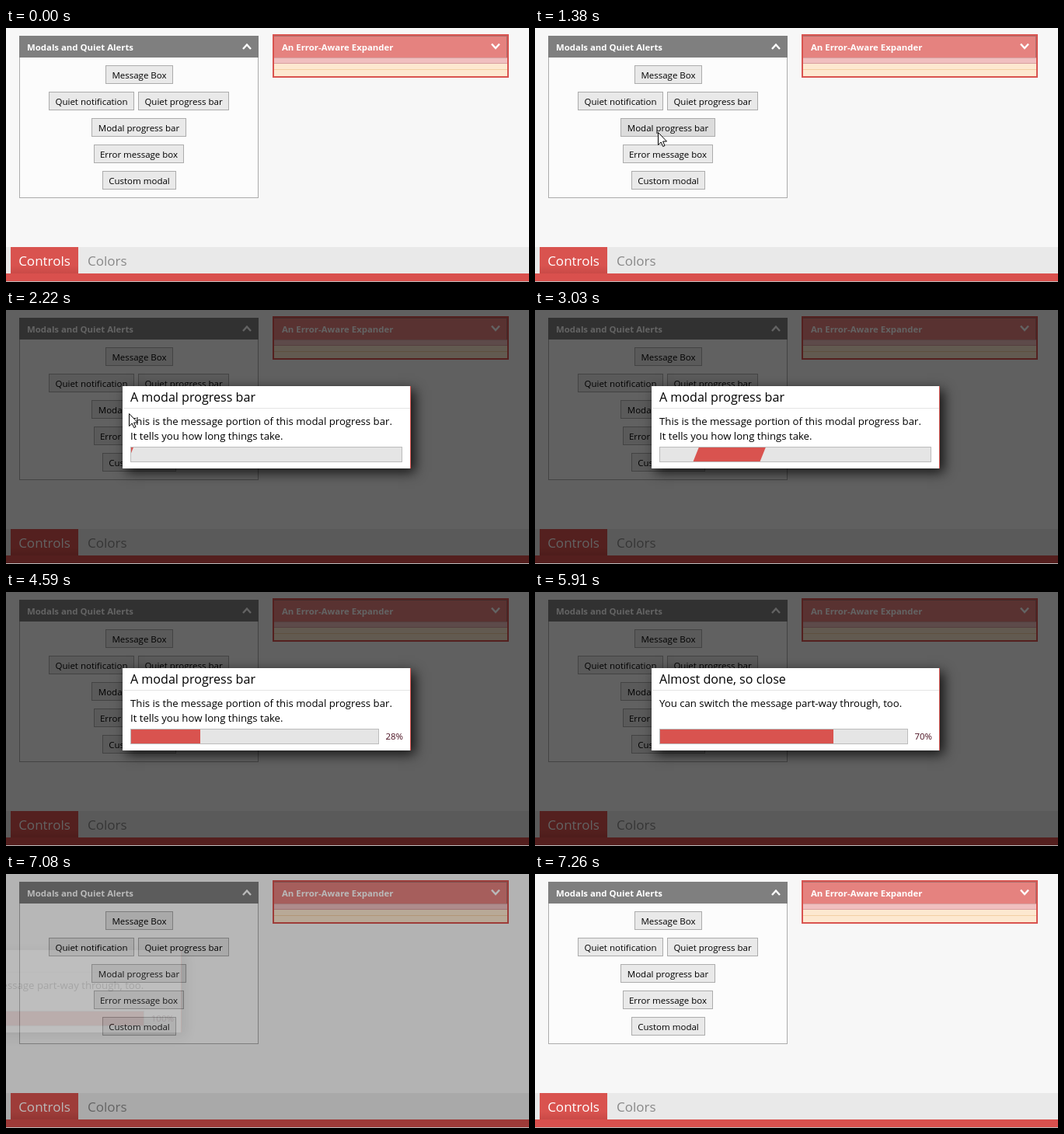
An HTML page for the animation above (7860 ms loop, 673x327 px).

```html
<!DOCTYPE html>
<html lang="en">
<head>
<meta charset="utf-8">
<title>Modal progress bar</title>
<style>
html, body { margin: 0; width: 100%; height: 100%; overflow: hidden; }
body { position: relative; background: #f7f7f7; font: 11.5px "Open Sans", "Noto Sans", sans-serif; color: #000; }
div, button, svg { position: absolute; box-sizing: border-box; white-space: nowrap; }
svg { overflow: visible; }
button { height: 24px; padding: 0; border: 1px solid #acacac; background: #e9e9e9; font: inherit; line-height: 23px; color: #000; }
.panel { left: 17px; top: 10px; width: 308px; height: 209px; border: 1px solid #acacac; background: #fcfcfc; }
.head { height: 28px; padding-left: 10px; font-size: 11.4px; font-weight: bold; line-height: 29px; color: #fff; }
.chevron { fill: none; stroke: #fff; stroke-width: 2.4; }
.error { left: 343px; top: 8px; width: 304px; height: 56px; border: 2px solid #d9534f; background: #fde8d0; }
.row { left: 0; width: 300px; }
.tabs { left: 0; top: 282px; width: 673px; height: 34px; background: #e9e9e9; font-size: 17px; line-height: 35px; }
.tab { left: 6px; width: 87px; height: 34px; text-align: center; color: #fff; background: linear-gradient(#d9534f 70%, #c94a47); }
#shade { left: 0; top: 0; width: 673px; height: 326px; background: #000; }
#modal { left: 150px; top: 98px; width: 371px; height: 106px; background: #fff; border: solid #d9534f; border-width: 0 1px; box-shadow: 5px 5px 15px rgba(0, 0, 0, .8); }
#title { left: 9px; top: 0; font-size: 16.1px; line-height: 28px; }
#message { left: 9px; top: 36px; font-size: 13.2px; line-height: 19px; white-space: pre; }
#bar { left: 9px; top: 78px; height: 20px; border: 1px solid #bcbcbc; background: #e5e5e5; overflow: hidden; }
#fill { left: -1px; top: -1px; height: 20px; background: #d9534f; }
#percent { right: 9px; top: 78px; line-height: 20px; color: #4a1020; }
</style>
</head>
<body>
<div class="panel"></div>
<div class="head" style="left:17px;top:10px;width:308px;background:#7f7f7f">Modals and Quiet Alerts</div>
<button style="left:128px;top:48px;width:87px">Message Box</button>
<button style="left:55px;top:82px;width:110px">Quiet notification</button>
<button style="left:170px;top:82px;width:117px">Quiet progress bar</button>
<button id="target" style="left:110px;top:116px;width:122px">Modal progress bar</button>
<button style="left:113px;top:150px;width:116px">Error message box</button>
<button style="left:124px;top:184px;width:95px">Custom modal</button>
<div class="error">
  <div class="head row" style="top:0;background:#e5827f;border:solid #a9706e;border-width:1px 1px 0 0;line-height:28px">An Error-Aware Expander</div>
  <div class="row" style="top:28px;height:8px;background:#f0c0c0;border:solid #d9a0a0;border-width:1px 0"></div>
  <div class="row" style="top:43px;height:1px;background:#f3cfa4"></div>
</div>
<svg class="chevron" style="left:0;top:0" width="673" height="60"><path d="M305 27l5-5.5 5 5.5M625 20.500l5 5.500 5-5.500"/></svg>
<div class="tabs">
  <div class="tab">Controls</div>
  <div style="left:105px;color:#888">Colors</div>
</div>
<div style="left:0;top:316px;width:673px;height:10px;background:#d9504d"></div>
<div style="left:0;top:326px;width:673px;height:1px;background:#bbb"></div>
<div id="shade"></div>
<div id="modal">
  <div id="title"></div>
  <div style="left:0;top:28px;width:369px;height:1px;background:#e4e4e4"></div>
  <div id="message"></div>
  <div id="bar"><div id="fill"></div></div>
  <div id="percent"></div>
</div>
<svg id="cursor" style="left:0;top:0" width="12" height="19"><path d="M.5.5V16.500L4.200 13 6.700 18.500 9 17.500 6.600 12H11.500Z" fill="#fff" stroke="#000"/></svg>
<script>
const LOOP = 7860, OPEN = 1770, CLOSE = 6865, COUNT = 3700;
const FADE_IN = 420, FADE_OUT = 395, SLIDE = 325;
const $ = id => document.getElementById(id);
const [target, shade, modal, title, message, bar, fill, percent, cursor] =
  ['target', 'shade', 'modal', 'title', 'message', 'bar', 'fill', 'percent', 'cursor'].map($);

const clamp = x => Math.min(1, Math.max(0, x));
const easeOut = x => 1 - (1 - x) ** 3;
const smooth = x => x * x * (3 - 2 * x);

// time, x, y
const path = [[420, -12, 226], [1200, 158, 138], [1260, 158, 138], [1440, 158, 133], [2220, 158, 133], [2930, -14, 162]];
// first percentage, title
const titles = [[0, 'A modal progress bar'], [33, 'Almost halfway there'], [60, 'Almost done, so close'], [85, 'Done!']];
const firstMessage = 'This is the message portion of this modal progress bar.\nIt tells you how long things take.';
const laterMessage = 'You can switch the message part-way through, too.';

function moveCursor(t) {
  let [, x, y] = path[0];
  for (let i = 1; i < path.length; i++) {
    const [t0, x0, y0] = path[i - 1], [t1, x1, y1] = path[i];
    if (t < t0) break;
    const k = smooth(clamp((t - t0) / (t1 - t0)));
    x = x0 + (x1 - x0) * k;
    y = y0 + (y1 - y0) * k;
  }
  cursor.style.transform = `translate(${Math.round(x)}px, ${Math.round(y)}px)`;
  const hover = x > 110 && y < 140 && t < OPEN;
  target.style.background = hover ? (t > 1440 && t < 1530 ? '#c9c9c9' : '#dcdcdc') : '';
}

function drawModal(t) {
  const enter = clamp((t - OPEN) / FADE_IN), leave = clamp((t - CLOSE) / FADE_OUT);
  const shown = easeOut(enter) - easeOut(leave);
  shade.style.opacity = .61 * (enter - leave);
  modal.style.opacity = shown;
  modal.style.transform = `translateX(${Math.round(-SLIDE * (1 - shown))}px)`;
  modal.style.borderColor = enter < 1 ? '#fff #fff #fff #d9534f' : '#fff #d9534f #fff #fff';
}

function drawProgress(t) {
  const counting = t >= COUNT;
  const n = counting ? Math.min(100, Math.floor((t - COUNT) / 31.43)) : 0;
  title.textContent = titles.filter(([from]) => n >= from).pop()[1];
  message.textContent = n < 33 ? firstMessage : laterMessage;
  percent.textContent = counting ? n + '%' : '';
  const width = counting ? 334 - 7 * String(n).length : 350;
  bar.style.width = width + 'px';
  fill.style.width = counting ? width * n / 100 + 'px' : '94px';
  fill.style.clipPath = counting ? '' : 'polygon(8px 0, 100% 0, 86px 100%, 0 100%)';
  fill.style.transform = counting ? '' : `translateX(${43 + (t - 3030) * .164}px)`;
}

function frame() {
  const t = performance.now() % LOOP;
  moveCursor(t);
  drawModal(t);
  drawProgress(t);
  requestAnimationFrame(frame);
}
frame();
</script>
</body>
</html>
```
